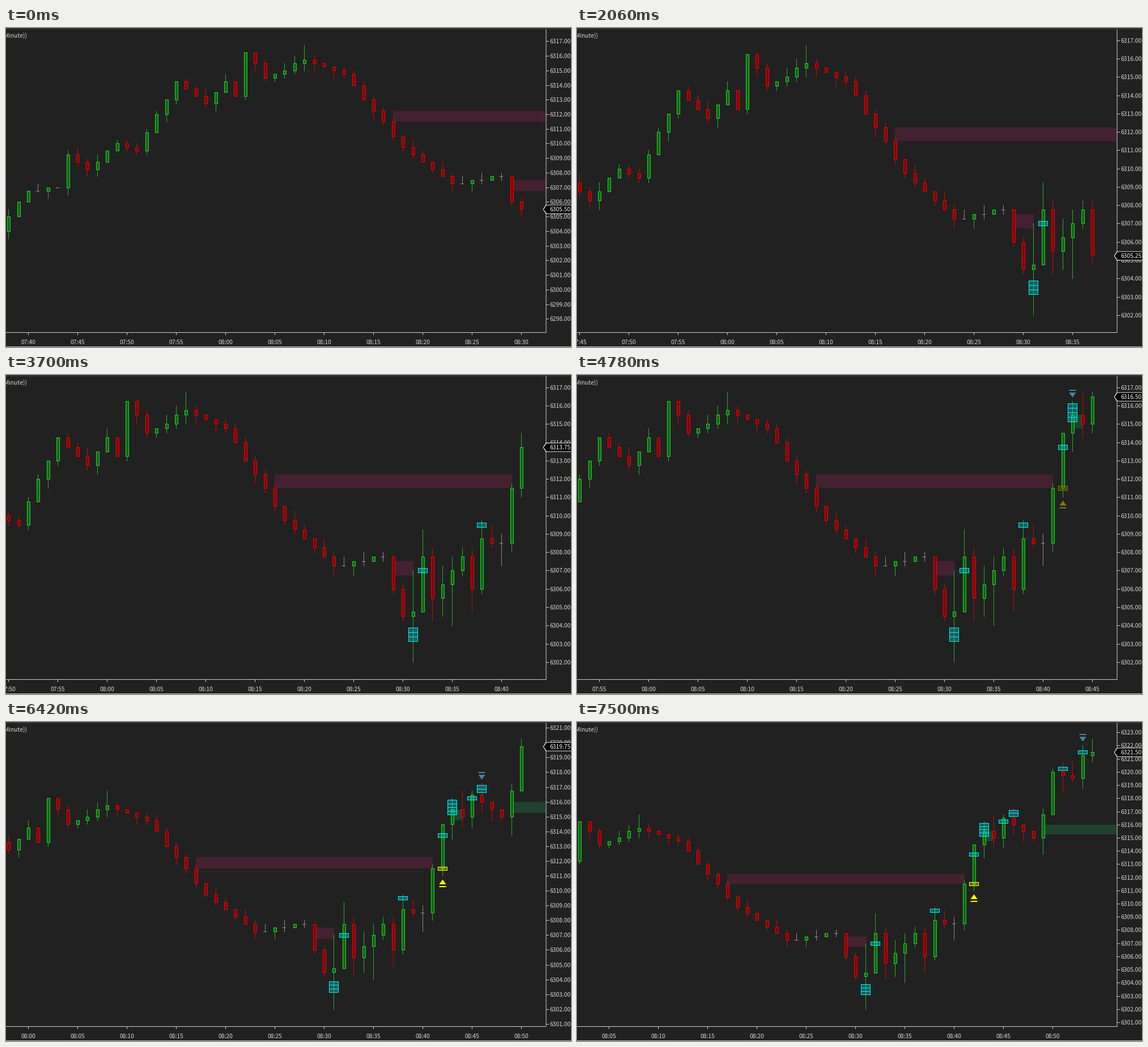
Write a matplotlib script that moves like this. It is 997x562 px and loops after 8 s.

```python
import numpy as np
import matplotlib.pyplot as plt
from matplotlib.animation import FuncAnimation
from matplotlib.collections import PolyCollection

W, H = 997, 562
LOOP, STEP = 8000, 20
plt.rcParams["font.family"] = "Noto Sans CJK JP"

STARTS = [400, 960, 1500, 2060, 2600, 3140, 3700,
          4240, 4780, 5320, 5860, 6420, 6960, 7500]
# Price of the newest bar in each step.
LIVE = [14, 18, 12, 19, 13, 25, 26, 47, 53, 58, 56, 54, 71, 70, 78]

# Prices are quarter points above BASE, bars are minutes after 08:00.
BASE, SHOWN, BARS = 6302, 53, np.arange(-22, 55)
TURNS = [(-23, 8), (-22, 12), (-20, 19), (-17, 20), (-16, 29), (-14, 25),
         (-11, 32), (-9, 30), (-5, 49), (-2, 43), (0, 49), (1, 45), (2, 57),
         (4, 50), (8, 55), (12, 51), (18, 31), (23, 21), (28, 23), (30, 10),
         (31, 11), (32, 23), (33, 14), (36, 23), (37, 16), (38, 27), (40, 26),
         (42, 50), (43, 54), (44, 52), (45, 58), (48, 52), (49, 59), (50, 72),
         (52, 70), (53, 77), (54, 78)]
PEAKS = {8: 59, 31: 20, 32: 29, 38: 31, 43: 57, 46: 61,
         50: 73, 51: 75, 53: 80, 54: 82}
DIPS = {31: 0, 35: 8, 42: 36}

BG = (33, 33, 33)
TEXT, AXIS = (212, 212, 212), (205, 205, 205)
GREEN, GREEN_FILL = (46, 205, 50), (10, 106, 16)
RED, RED_FILL = (245, 0, 0), (128, 4, 10)
GRAY = (150, 150, 150)
CYAN, BLUE = (0, 240, 245), (76, 130, 160)
YELLOW, OLIVE = (255, 255, 0), (130, 122, 0)
SUPPLY, DEMAND = (67, 33, 49), (31, 66, 48)

# Zones: bar, top, bottom, bar that fills it, colour.
ZONES = [(17, 41, 38, 41, SUPPLY), (29, 22, 19, 31, SUPPLY),
         (43, 54, 51, 44, DEMAND), (49, 56, 53, 99, DEMAND)]
# Stacked cells: bar, top price, count.
CELLS = [(31, 7, 3), (32, 20, 1), (38, 30, 1), (42, 47, 1), (43, 56, 4),
         (45, 57, 1), (46, 60, 2), (51, 73, 1), (53, 78, 1)]
SIGNALS = (43, 46, 51, 53)


def make_bars():
    """Open, high, low, close per minute: turning points plus random wicks."""
    rng = np.random.default_rng(8)
    path = np.rint(np.interp(range(-23, 55), *zip(*TURNS))).astype(int)
    opens, closes = path[:-1], path[1:]
    reach = np.where(BARS > 30, 6, 3)
    cap = np.where(BARS < 46, 59, np.where(BARS < 50, 61, 82))
    highs = np.maximum(opens, closes) + rng.integers(0, reach)
    highs = np.minimum(highs, cap)
    lows = np.minimum(opens, closes) - rng.integers(0, reach)
    rows = zip(BARS.tolist(), opens, highs, lows, closes)
    return {m: (o, PEAKS.get(m, h), DIPS.get(m, l), c)
            for m, o, h, l, c in rows}


def forming(bar, price):
    """The bar while its close is still at price."""
    o, h, l, _ = bar
    top, bottom = max(o, price), min(o, price)
    return (o, max(top, min(h, top + 4)),
            min(bottom, max(l, bottom - 2)), price)


def rgba(c, a=1.0):
    return (c[0] / 255, c[1] / 255, c[2] / 255, a)


class Layer:
    """Collects filled shapes in pixel coordinates."""

    def __init__(self):
        self.verts, self.colors = [], []

    def poly(self, pts, color, a=1.0):
        self.verts.append(pts)
        self.colors.append(rgba(color, a))

    def rect(self, x0, y0, x1, y1, color, a=1.0):
        """Pixel columns x0..x1 and rows y0..y1, both inclusive."""
        x1, y1 = x1 + 1, y1 + 1
        self.poly([(x0, y0), (x1, y0), (x1, y1), (x0, y1)], color, a)

    def frame(self, x0, y0, x1, y1, color):
        for box in ((x0, y0, x1, y0), (x0, y1, x1, y1),
                    (x0, y0, x0, y1), (x1, y0, x1, y1)):
            self.rect(*box, color)

    def add(self, z):
        col = PolyCollection(self.verts, facecolors=self.colors, snap=False,
                             edgecolors="none", linewidths=0, zorder=z)
        return ax.add_collection(col, autolim=False)


fig = plt.figure(figsize=(W / 100, H / 100), dpi=100, facecolor=rgba(BG))
ax = fig.add_axes([0, 0, 1, 1])
ax.set_xlim(0, W)
ax.set_ylim(H, 0)
ax.axis("off")


def label(x, y, s, ha="left", color=TEXT, z=3):
    return ax.text(x, y + 4.2, s, ha=ha, va="baseline", color=rgba(color),
                   fontsize=10.2 * 0.72, zorder=z)


def signal(layer, x, y, side, color):
    """Triangle with a bar behind it; side -1 is above y, 1 below."""
    x += 0.5
    tip, base = y + 6.5 * side, y + 15 * side
    layer.poly([(x - 6, base), (x + 6, base), (x, tip)], color)
    b0, b1 = y + 18 * side, y + 20 * side
    layer.poly([(x - 6, b0), (x + 6, b0), (x + 6, b1), (x - 6, b1)], color)


def candle(layer, x, bar, row):
    o, h, l, c = bar
    if o == c:
        layer.rect(x, row(h), x, row(l), GRAY, 0.9)
        layer.rect(x - 3, row(c), x + 2, row(c), GRAY)
        return
    edge, fill = (GREEN, GREEN_FILL) if c > o else (RED, RED_FILL)
    top, bottom = row(max(o, c)), row(min(o, c))
    layer.rect(x, row(h), x, row(l), edge, 0.8)
    layer.rect(x - 2, top, x + 3, bottom, edge)
    layer.rect(x - 1, top + 1, x + 2, bottom - 1, fill)


def build(k):
    last = 30 + round((5 * k + 1) / 3)
    first = last - SHOWN + 1
    bars = {m: ALL_BARS[m] for m in range(first, last + 1)}
    bars[last] = forming(bars[last], LIVE[k])

    hi = max(b[1] for b in bars.values())
    lo = -15 if k < 2 else -4 if k < 4 else 0

    def row(v):
        return int(30.3 + (hi - v) * 476 / (hi - lo))

    def col(m):
        return round(909 - 17.4 * (last - m))

    plot, texts = Layer(), []

    for m, top, bottom, end, color in ZONES:
        if m < last:
            x1 = col(end) if end <= last else 951
            plot.rect(col(m), row(top), x1, row(bottom) - 1, color)

    for m, bar in bars.items():
        candle(plot, col(m), bar, row)

    def cell(m, v, color):
        x, y0, y1 = col(m), row(v + 0.5), row(v - 0.5)
        plot.rect(x - 8, y0, x + 8, y1, color, 0.3)
        plot.frame(x - 8, y0, x + 8, y1, color)

    for m, top, count in CELLS:
        if m < last:
            for v in range(top, top - count, -1):
                cell(m, v, CYAN)

    if last > 42:
        color = YELLOW if last > 45 else OLIVE
        cell(42, 38, color)
        signal(plot, col(42), row(bars[42][2]), 1, color)
    fresh = [m for m in SIGNALS if m < last]
    if fresh:
        m = fresh[-1]
        signal(plot, col(m), row(bars[m][1]), -1, BLUE)

    for p in range(6290, 6330):
        y = row((p - BASE) * 4)
        if 2 < y < 536:
            plot.rect(953, y, 957, y, AXIS)
            if y >= 9:
                texts.append(label(959.5, y, f"{p}.00"))

    for m in range(first, last + 1):
        if m % 5 == 0:
            x = col(m)
            plot.rect(x, 537, x, 540, AXIS)
            hh, mm = divmod(480 + m, 60)
            texts.append(label(x + 0.5, 552.5, f"{hh:02d}:{mm:02d}", "center"))

    # Current price tag
    y = row(LIVE[k]) + 0.5
    tag = Layer()
    for x, half, color in ((947.5, 8, (225, 225, 225)), (948.8, 7, (0, 0, 0))):
        tag.poly([(x, y), (x + 5, y - half), (W, y - half),
                  (W, y + half), (x + 5, y + half)], color)
    texts.append(label(959.5, y - 0.5, f"{BASE + LIVE[k] / 4:.2f}",
                       color=(255, 255, 255), z=5))
    return [plot.add(2), tag.add(4), *texts]


base = Layer()
base.rect(0, 1, W, 1, (72, 72, 72))
base.rect(0, 561, W, 561, (190, 190, 190))
base.rect(952.5, 2, 952.5, 536, AXIS)
base.rect(0, 536, 952, 536, AXIS)
base.add(2.5)
label(37, 12.5, "Minute))", "right")

ALL_BARS = make_bars()
states = [build(k) for k in range(len(LIVE))]


def update(n):
    now = sum(n * STEP >= s for s in STARTS)
    for k, artists in enumerate(states):
        for a in artists:
            a.set_visible(k == now)
    return []


update(0)
anim = FuncAnimation(fig, update, frames=LOOP // STEP, interval=STEP,
                     repeat=True, repeat_delay=0, blit=False)
plt.show()
```
